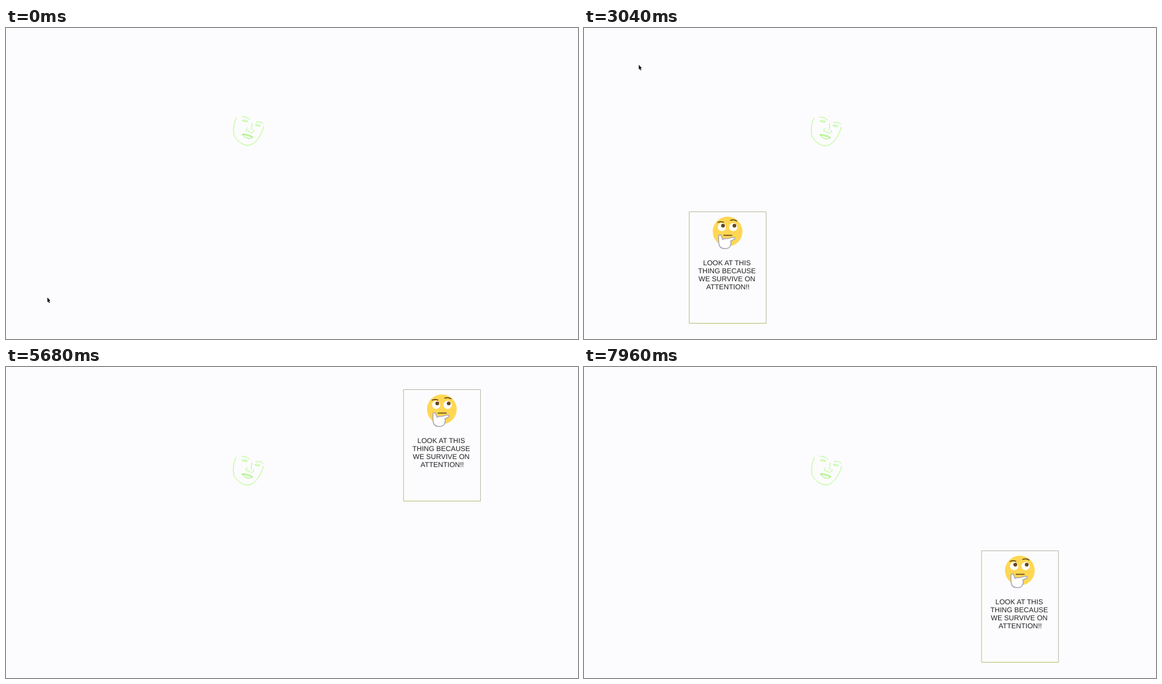
Write an HTML page that moves like this. It is 1000 by 544 pixels and loops after 8000 ms.

```html
<!DOCTYPE html>
<html lang="en">
<head>
<meta charset="utf-8">
<title>Attention card</title>
<style>
  html, body { margin: 0; width: 100%; height: 100%; overflow: hidden; background: #fcfcfe; }
  svg { display: block; width: 1000px; height: 544px; }

  #face, #card, #cursor { animation: 8s linear infinite; }
  #face { animation-name: face; animation-timing-function: step-end; }
  #card { animation-name: card; animation-timing-function: step-end; }
  #cursor { animation-name: cursor; animation-timing-function: ease-in-out; }

  #face path { fill: none; stroke: #7dfa32; stroke-width: .7; stroke-linejoin: round; }
  #face .mouth { stroke: #62ea18; }
  #card text {
    font: 12.35px "Liberation Sans", Arial, sans-serif;
    text-anchor: middle; text-rendering: geometricPrecision; fill: #222;
  }
  .brow { fill: none; stroke: #65471b; stroke-width: 1.7; stroke-linecap: round; }

  @keyframes face {
    0% { transform: translate(.6px, -1px); }
    3% { transform: translate(.8px, -.7px); }
    8% { transform: translate(.3px, -.4px); }
    14% { transform: translate(.6px, .1px); }
    20% { transform: translate(.2px, -.2px); }
    26% { transform: translate(0, 0); }
    32% { transform: translate(.3px, .2px); }
    37% { transform: translate(0, -.2px); }
    43% { transform: translate(.5px, .1px); }
    48% { transform: translate(.9px, 0); }
    54% { transform: translate(.6px, -.3px); }
    60% { transform: translate(.4px, 0); }
    68% { transform: translate(.1px, .2px); }
    76% { transform: translate(.5px, 0); }
    82% { transform: translate(.1px, 0); }
    90% { transform: translate(.4px, -.2px); }
    98%, 100% { transform: translate(.6px, .1px); }
  }

  /* The card jumps between the four quadrants. */
  @keyframes card {
    0% { visibility: hidden; transform: translate(183px, 321px); }
    16.5% { visibility: visible; transform: translate(183px, 321px); }
    23.5% { transform: translate(694px, 321px); }
    35% { transform: translate(183px, 321px); }
    45.5% { transform: translate(183px, 39px); }
    57% { transform: translate(694px, 321px); }
    68% { transform: translate(694px, 39px); }
    79% { transform: translate(694px, 321px); }
    90% { transform: translate(183px, 39px); }
    97%, 100% { visibility: visible; transform: translate(694px, 321px); }
  }

  @keyframes cursor {
    0%, 1% { transform: translate(72px, 471px); }
    4% { transform: translate(68px, 478px); animation-timing-function: ease-in; }
    11% { transform: translate(704px, 300px); animation-timing-function: ease-out; }
    16% { transform: translate(988px, 240px); }
    21.5% { transform: translate(900px, 156px); }
    26%, 27% { transform: translate(905px, 79px); }
    32% { transform: translate(116px, 35px); animation-timing-function: ease-out; }
    37%, 43% { transform: translate(95.5px, 64px); }
    48.5%, 54% { transform: translate(117.5px, 486px); }
    59.5%, 64% { transform: translate(864px, 462px); }
    68% { transform: translate(984px, 440px); visibility: visible; animation-timing-function: step-end; }
    68.5%, 100% { transform: translate(984px, 440px); visibility: hidden; }
  }
</style>
</head>
<body>
<svg viewBox="0 0 1000 544">
  <g id="face">
    <path d="M402.5 157C398 166 396 178 398 188C401 197 412 206 422 206.3C432 206 440 196 444 188C447 182 449.5 177 450 173"/>
    <path d="M411.5 156Q419 155 426 161.5M436 165.5Q444 164 449.5 168.5"/>
    <path d="M412.5 163Q417 160.5 422 164.5Q417 166.5 412.5 163ZM435 170.5Q439.5 168.5 444 172Q439 174.5 435 170.5Z"/>
    <path d="M429.7 167L428.5 179M422.5 175.5Q418 178 419 180Q421 182 424 181.5Q426 185 429.5 184Q434 183 432.5 178.5"/>
    <path class="mouth" d="M412.5 187Q418 185.5 421 187.5Q427 187.5 431 192Q426 196 420 193.5Q415 191.5 412.5 187L431 192"/>
  </g>

  <g id="card" visibility="hidden">
    <path d="M1 .5H135.5V195.5" fill="none" stroke="#b3b4a4"/>
    <path d="M1 0V195.5H136" fill="none" stroke="#b5b868"/>
    <circle cx="68" cy="35" r="26" fill="#ffd753"/>
    <g fill="#fff"><circle cx="58" cy="27.2" r="7.2"/><circle cx="78" cy="27.2" r="7.2"/></g>
    <g fill="#65471b"><circle cx="60" cy="24.7" r="3.3"/><circle cx="80" cy="24.7" r="3.3"/></g>
    <path class="brow" d="M51 19Q56 17 61 18.8M73 15.5Q79 13.3 84 16.5"/>
    <path class="brow" d="M61.5 41.7H75.5"/>
    <path d="M52.5 42.5Q54 39.5 57 42L59.5 49Q62 47 67 47.5L78 45Q82 45 80.5 48L73 52Q75.5 54 73.5 56Q74.5 58.5 72.5 60Q72 64.5 64 65Q54 65 52.8 57Q52 50 52.5 42.5Z" fill="#fff" stroke="#aaa9b6" stroke-width="1.7" stroke-linejoin="round"/>
    <text>
      <tspan x="68.6" y="94">LOOK AT THIS</tspan>
      <tspan x="68.6" y="108">THING BECAUSE</tspan>
      <tspan x="68.6" y="122">WE SURVIVE ON</tspan>
      <tspan x="68.6" y="136">ATTENTION!!</tspan>
    </text>
  </g>

  <path id="cursor" d="M.4 .3V8.6L2 7.2L3.3 10.2L4.6 9.6L3.3 6.6H5.6Z" fill="#000" stroke="#fff" stroke-width=".6" paint-order="stroke"/>
</svg>
</body>
</html>
```
